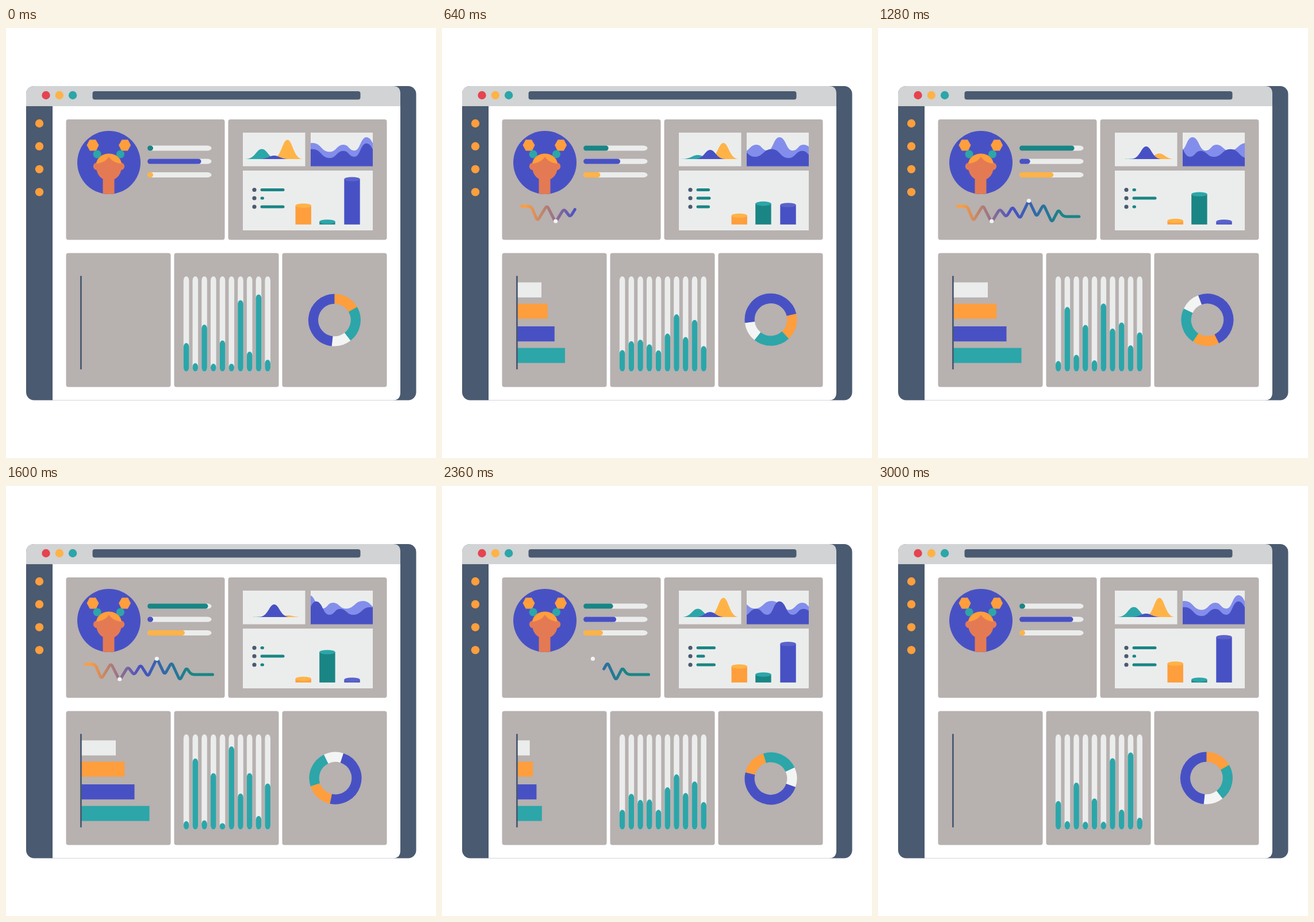
These frames come from a looping animation (748 px wide and 748 px high, 3040 ms). An HTML page:

```html
<!DOCTYPE html>
<html lang="en">
<head>
<meta charset="utf-8">
<title>Dashboard</title>
<style>
html, body { margin: 0; width: 100%; height: 100%; overflow: hidden; background: #fff; }
svg { display: block; width: 748px; height: 748px; }
</style>
</head>
<body>
<svg id="stage" viewBox="0 0 748 748">
  <defs>
    <linearGradient id="ink" gradientUnits="userSpaceOnUse" x1="145" y1="0" x2="320" y2="0">
      <stop offset="0" stop-color="#ff9e3d"/>
      <stop offset=".5" stop-color="#4851c4"/>
      <stop offset="1" stop-color="#1a8585"/>
    </linearGradient>
    <clipPath id="waveBox"><rect x="530" y="182" width="108" height="58.5"/></clipPath>
    <clipPath id="face"><circle cx="179" cy="234" r="55"/></clipPath>
  </defs>
  <!-- window -->
  <rect x="35" y="101" width="678.5" height="546.5" rx="14" fill="#4a5a70"/>
  <path d="M81 136H686V634Q686 647.5 673 647.5H81Z" fill="#fff"/>
  <path d="M35 136V115Q35 101 49 101H673Q686 101 686 114V136Z" fill="#d1d3d4"/>
  <rect x="150.5" y="110" width="466" height="14.5" rx="4" fill="#4a5a70"/>
</svg>
<script>
const stage = document.getElementById('stage');
const TEAL = '#2ca6a9', DEEP = '#1a8585', BLUE = '#4851c4', ORANGE = '#ff9e3d',
  AMBER = '#ffb347', PALE = '#ebedec', NAVY = '#4a5a70', SKIN = '#e47a54';

function set(node, attrs) {
  for (const k in attrs) node.setAttribute(k, attrs[k]);
  return node;
}
function add(tag, attrs, parent = stage) {
  return parent.appendChild(set(document.createElementNS('http://www.w3.org/2000/svg', tag), attrs));
}
const rect = (x, y, width, height, fill, rx = 0, ry = rx) => add('rect', {x, y, width, height, fill, rx, ry});
const dot = (cx, cy, r, fill) => add('circle', {cx, cy, r, fill});
const path = (d, fill, parent) => add('path', {d, fill}, parent);

// Hermite step from 0 to 1 with the given end slopes
const ease = (p, a = 0, b = 0) =>
  p * p * (3 - 2 * p) + a * p * (1 - p) ** 2 - b * p * p * (1 - p);
const clamp = v => Math.max(0, Math.min(1, v));
const PEAK = 1600, END = 3000;
// 0 -> 1 until PEAK, then back to 0 until END
const cycle = (t, [a, b, c, d]) => clamp(t < PEAK
  ? ease(t / PEAK, a, b)
  : 1 - ease((t - PEAK) / (END - PEAK), c, d));
const SOFT = [0, 0, 0, 0], LINEAR = [1, 1, 1, 1], QUICK = [1.5, -.55, .6, -1.45];
const mix = (a, b, k) => a + (b - a) * k;
const updates = [];

// Window dots and panels
['#e5434f', AMBER, TEAL].forEach((c, i) => dot(69.5 + 23.3 * i, 117, 7.2, c));
for (let i = 0; i < 4; i++) dot(58, 166 + 39.8 * i, 7.2, ORANGE);
for (const x of [104.5, 386.5]) rect(x, 159, 276, 209.5, '#b7b1b0', 4);
for (const x of [104.5, 292.5, 480.5]) rect(x, 391.5, 182, 233, '#b7b1b0', 4);

// Avatar
dot(179, 234, 55, BLUE);
const hexagon = 'M145.5 194.2L156 194.2L161.5 203.8L156.8 213.4L145.8 213.4L140.5 203.8Z';
path(hexagon, ORANGE);
set(path(hexagon, ORANGE), {transform: 'matrix(-1 0 0 1 357.6 0)'});
dot(158.6, 219.5, 7, TEAL);
dot(199, 219.5, 7, TEAL);
dot(158.3, 240.7, 6.5, SKIN);
dot(199.7, 240.7, 6.5, SKIN);
set(rect(168.5, 255, 20, 36, SKIN), {'clip-path': 'url(#face)'});
path('M157 238C157 212 201 212 201 238C202 255 192 265 179 265C166 265 156 255 157 238Z', SKIN);
path('M157 236C161 213 197 213 201 236C190 235 183 230 179 224C175 230 168 235 157 236Z', ORANGE);

// Progress pills
[[204.5, DEEP, 10, 105.5], [227.5, BLUE, 93.5, 10], [251, AMBER, 10, 65]].forEach(([y, color, from, to]) => {
  rect(246, y, 111.5, 9, PALE, 8, 4.5);
  const bar = rect(246, y, from, 9, color, 5, 4.5);
  updates.push(t => set(bar, {width: mix(from, to, cycle(t, SOFT))}));
});

// Zigzag line with two markers
const zig = [[138.5, 310], [155, 310], [166, 335.5], [182.5, 308.5], [197.5, 338], [212, 314.5],
  [223, 329], [234, 311], [247, 331.5], [262.5, 300], [276, 328], [288, 307], [302.5, 338],
  [314, 316], [322, 328], [359.5, 328]];
function rounded(pts, r) {
  const toward = (a, b) => {
    const k = r / Math.hypot(b[0] - a[0], b[1] - a[1]);
    return [mix(a[0], b[0], k), mix(a[1], b[1], k)];
  };
  let d = 'M' + pts[0];
  for (let i = 1; i < pts.length - 1; i++)
    d += `L${toward(pts[i], pts[i - 1])}Q${pts[i]} ${toward(pts[i], pts[i + 1])}`;
  return d + 'L' + pts.at(-1);
}
const line = set(path(rounded(zig, 5.5), 'none'),
  {stroke: 'url(#ink)', 'stroke-width': 5, 'stroke-linecap': 'round', pathLength: 1});
updates.push(t => {
  const head = ease(clamp(t / 1420)), tail = ease(clamp((t - 1620) / 1180));
  set(line, {
    'stroke-dasharray': `${head - tail} 2`,
    'stroke-dashoffset': -tail,
    visibility: head - tail > .001 ? 'visible' : 'hidden'
  });
});
[[197.7, 336, 480, 2120], [262.4, 300.5, 800, 2440]].forEach(([x, y, on, off]) => {
  const mark = dot(x, y, 0, '#f3f4f4');
  updates.push(t => set(mark, {r: 3.6 * clamp((t - on) / 120) * clamp((off + 120 - t) / 120)}));
});

// Hills
rect(412, 182, 108.5, 58.5, PALE);
[[445, 29, 17.5, .5, TEAL, QUICK],
 [489.5, 27, 33.5, 3, AMBER, [-.71, .73, 1.66, -1.84]],
 [466.5, 27, 6, 22, BLUE, QUICK]].forEach(([x, w, low, high, color, speed]) => {
  const hill = path('', color);
  updates.push(t => {
    const y = 228 - mix(low, high, cycle(t, speed));
    set(hill, {d: `M${x - w} 228C${x - w * .38} 228 ${x - w * .34} ${y} ${x} ${y}` +
      `C${x + w * .34} ${y} ${x + w * .38} 228 ${x + w} 228Z`});
  });
});

// Two copies of one periodic wave, scrolling in opposite directions
rect(530, 182, 108, 58.5, PALE);
const PERIOD = 187.5;
const swell = [[587, 203], [606, 213.3], [627, 190], [650, 213.3], [668.5, 203], [691.5, 213.3], [721, 200], [750.5, 215.5]];
let waveD = 'M0 260', last;
for (let n = -3; n < 3; n++)
  for (const [px, y] of swell) {
    const x = px + n * PERIOD;
    if (last) {
      const m = (last[0] + x) / 2;
      waveD += `C${m} ${last[1]} ${m} ${y} ${x} ${y}`;
    } else waveD = `M${x} 280V${y}`;
    last = [x, y];
  }
waveD += 'V280Z';
const waveGroup = add('g', {'clip-path': 'url(#waveBox)'});
[['#838eec', 0, -1], [BLUE, 10.7, 1]].forEach(([color, dy, dir]) => {
  const wave = path(waveD, color, waveGroup);
  updates.push(t => set(wave, {transform: `translate(${dir * PERIOD * t / END} ${dy})`}));
});

// Legend lines and cylinders
rect(412, 248, 226, 104, PALE);
[281.5, 296, 311].forEach((y, i) => {
  dot(432, y, 3.6, NAVY);
  const bar = rect(442.5, y - 2.5, 42, 5, DEEP, 2.5);
  const [from, to] = i === 1 ? [6.5, 42] : [42, 6.5];
  updates.push(t => set(bar, {width: mix(from, to, cycle(t, [.69, -.71, .185, -1.3]))}));
});
[[503.5, 309, 335.5, ORANGE, AMBER, [1.39, -1.12, 1.42, -.64]],
 [545.2, 337, 289, DEEP, TEAL, [1.9, -.3, .37, -1.53]],
 [588.3, 263, 337, BLUE, '#5a63ca', [1.39, -.58, .75, -1.42]]].forEach(([x, from, to, side, top, speed]) => {
  const body = rect(x, from, 27.4, 0, side);
  const lid = add('ellipse', {cx: x + 13.7, rx: 13.7, ry: 3.8, fill: top});
  updates.push(t => {
    const y = mix(from, to, cycle(t, speed));
    set(body, {y, height: 341.8 - y});
    set(lid, {cy: y});
  });
});

// Horizontal bars
[[442.5, 60, PALE], [479.5, 75.3, ORANGE], [519, 92.5, BLUE], [556.5, 118.5, TEAL]].forEach(([y, w, color]) => {
  const bar = rect(131, y, 0, 26.2, color);
  updates.push(t => set(bar, {width: w * cycle(t, [2.225, -.287, .66, 0])}));
});
rect(129, 431, 2.8, 163, NAVY, 1.2);

// Level meters: top at the start, top at the peak
[[548, 583, SOFT], [583, 474, SOFT], [516, 581.5], [584, 499.5], [543.5, 586.5],
 [584, 453], [473.5, 535], [563, 499.5], [463.5, 574], [577, 517.5]].forEach(([from, to, speed = LINEAR], i) => {
  const x = 308.8 + 15.73 * i;
  rect(x, 432, 9.6, 165.5, PALE, 4.8, 7);
  const bar = rect(x, from, 9.6, 0, TEAL, 4.8, 7);
  updates.push(t => {
    const y = mix(from, to, cycle(t, speed));
    set(bar, {y, height: 597.5 - y});
  });
});

// Ring
const ring = add('g', {});
[[0, 60, ORANGE], [60, 142, TEAL], [142, 186, '#f3f4f4'], [186, 360, BLUE]].forEach(([a, b, color]) =>
  add('circle', {
    cx: 571.4, cy: 508, r: 36.9, fill: 'none', stroke: color, 'stroke-width': 17.2, pathLength: 360,
    'stroke-dasharray': `${b - a} ${360 - b + a}`, transform: `rotate(${a - 90} 571.4 508)`
  }, ring));
updates.push(t => set(ring, {transform: `rotate(${360 * t / END} 572.2 508)`}));

// 25 steps per second
function frame(now) {
  const t = Math.min(Math.floor(now / 40) * 40 % 3040, END);
  for (const update of updates) update(t);
  requestAnimationFrame(frame);
}
frame(0);
</script>
</body>
</html>
```
